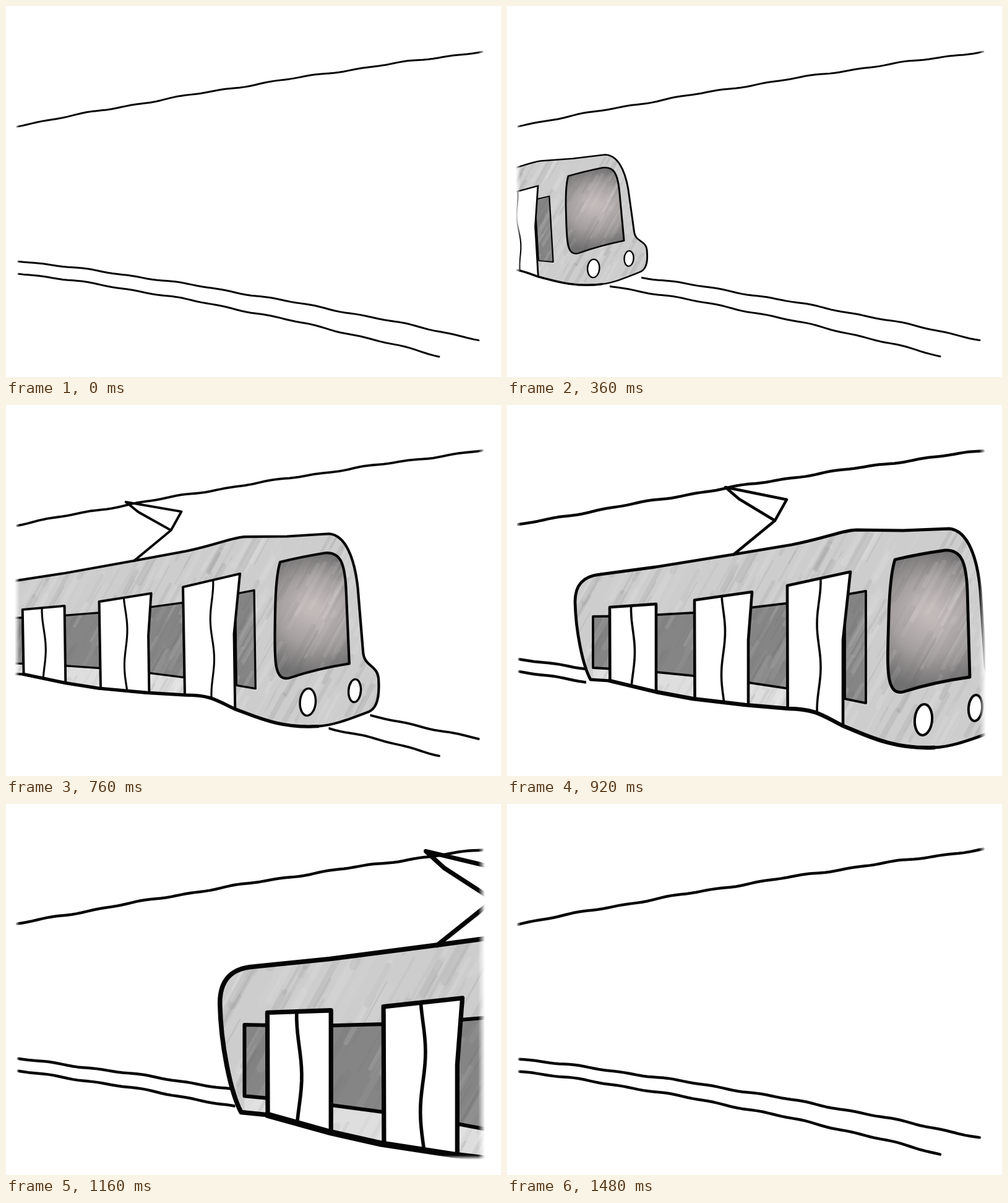
Write an HTML page with a canvas that moves like this. It is 800 by 600 pixels and loops after 1.68 s.

```html
<!DOCTYPE html>
<html lang="en">
<head>
<meta charset="utf-8">
<title>Passing tram</title>
<style>
  html, body { margin: 0; width: 100%; height: 100%; overflow: hidden; background: #fff; }
  canvas { display: block; }
</style>
</head>
<body>
<canvas id="stage" width="800" height="600"></canvas>
<script>
const ctx = document.getElementById("stage").getContext("2d");
const LOOP = 1680, HOLD = 200, STEP = 80, LAST = 17;

// The tram is drawn once around an anchor, then placed: drawing, x, y, x scale, y scale
const ANCHOR = { x: 627, y: 250 };
const POSES = [
  [0, -96, 285, .5, .45],
  [3, 99, 275, .69, .587],
  [6, 228, 266, .765, .709],
  [8, 443, 254, .905, .878],
  [10, 627, 250, 1, 1],
  [13, 1054, 252, 1.37, 1.39],
  [LAST, 1834, 265, 2, 1.95]
];

// Gently bent lines: height at the left end, slope, bend
const bent = (x0, y0, slope, bend) => x => y0 + slope * (x - x0) + bend * (x - x0) ** 2;
const wire = bent(18, 194, -.19, .00004);
const farRail = bent(20, 412, .12, .00007);
const nearRail = bent(20, 432, .13, .0001);
const doorTop = bent(166, 327, -.05, -.00025);
const windowTop = bent(139, 342, -.005, -.0002);
const windowBottom = bent(139, 425, .05, .00018);

let seed = 11;
const random = () => (seed = seed * 16807 % 2147483647) / 2147483647;

function line(...coords) {
  const path = new Path2D();
  for (let i = 0; i < coords.length; i += 2) path.lineTo(coords[i], coords[i + 1]);
  return path;
}

function shape(...coords) {
  const path = line(...coords);
  path.closePath();
  return path;
}

function lamp(x, y, rx, ry) {
  const path = new Path2D();
  path.ellipse(x, y, rx, ry, .08, 0, 7);
  return path;
}

const bottomEdge = "690 554 C 620 557 575 531 543 519 C 510 502 500 492 455 491 " +
  "L 385 485 L 300 475 L 241 464 L 166 446";
const underside = new Path2D("M " + bottomEdge);
const body = new Path2D(
  "M 135 444 C 122 420 111 365 110 318 C 110 292 122 277 150 274 L 240 262 L 370 241 " +
  "L 460 226 C 520 214 540 203 565 202 L 640 203 L 715 200 C 745 203 760 247 765 300 " +
  "L 773 420 C 775 448 801 442 800 475 C 801 505 795 525 780 530 C 740 545 715 553 " +
  bottomEdge + " Z");
const windshield = new Path2D(
  "M 627 250 Q 665 241 708 235 C 735 234 742 255 744 300 L 748 440 " +
  "Q 690 448 640 464 C 610 470 615 420 617 340 Q 619 275 627 250 Z");
const pantograph = line(366, 242, 433, 187, 452, 153, 353, 133, 375, 152, 433, 187);
const lamps = [lamp(673, 509, 14, 25), lamp(757, 490, 11, 21)];

// Doors run past the floor and are cut off by the body outline.
const doorSpans = [[166, 241], [303, 396], [453, 555]];
const doors = doorSpans.map(([l, r], i) =>
  shape(l, doorTop(l), r, doorTop(r), r - 6 * i, 380, r - 6 * i, 600, l + 1, 600));
const doorGaps = doorSpans.map(([l, r]) => {
  const x = (l + r) / 2, path = new Path2D();
  for (let y = doorTop(x); y < 560; y += 8) path.lineTo(x + 3 * Math.sin(y * .045 + x), y);
  return path;
});

const windowSpans = [[139, 166], [240, 303], [390, 453], [546, 580]];
const sideWindows = windowSpans.map(([l, r]) =>
  shape(l, windowTop(l), r, windowTop(r), r, windowBottom(r), l, windowBottom(l)));
const skirts = windowSpans.slice(0, 3).map(([l, r]) =>
  shape(l, windowBottom(l), r, windowBottom(r), r, 600, l, 600));

const brush = Array.from({ length: 420 }, () => {
  const x = 100 + random() * 740, y = 180 + random() * 370, length = 25 + random() * 70;
  const tone = random() < .55 ? 255 : 90;
  return {
    path: line(x, y, x - length * .55, y + length),
    color: `rgba(${tone},${tone},${tone},${.04 + random() * .08})`,
    width: 1.5 + random() * 9
  };
});

const glass = ctx.createRadialGradient(684, 335, 10, 684, 345, 115);
glass.addColorStop(0, "#c2bab9");
glass.addColorStop(.5, "#a59f9f");
glass.addColorStop(1, "#707070");

function ink(path, width) {
  ctx.strokeStyle = "#050505";
  ctx.lineWidth = width;
  ctx.stroke(path);
}

function fill(path, color) {
  ctx.fillStyle = color;
  ctx.fill(path);
}

function poseAt(drawing) {
  const next = Math.max(1, POSES.findIndex(p => p[0] >= drawing));
  const a = POSES[next - 1], b = POSES[next];
  const mix = (drawing - a[0]) / (b[0] - a[0]);
  const [, x, y, sx, sy] = a.map((v, i) => v + (b[i] - v) * mix);
  const ky = (x - ANCHOR.x) * .00011;
  return { x, y, sx, sy, ky, kx: Math.max(0, -.6 * ky) };
}

// Hand-drawn line whose tremble changes with every drawing
function cable(height, from, to, drawing) {
  const path = new Path2D();
  for (let x = from; x <= to; x += 8) {
    const tremble = Math.sin(x * .085 + drawing * 2.3) + Math.sin(x * .037 + drawing * 4.1);
    path.lineTo(x, height(x) + .7 * tremble);
  }
  ink(path, Math.min(4.5, Math.max(3, 3 + (drawing - 6) * .4)));
}

// The tram covers a rail from its rear end to the given point of its front.
function rail(height, end, front, pose, drawing) {
  const ground = x => pose.x + pose.sx * (x - ANCHOR.x) + pose.kx * 280;
  ctx.save();
  ctx.beginPath();
  ctx.rect(0, 0, Math.max(0, ground(128)), 600);
  ctx.rect(Math.max(0, ground(front)), 0, 1600, 600);
  ctx.clip();
  cable(height, 20, end, drawing);
  ctx.restore();
}

function drawTram({ x, y, sx, sy, kx, ky }) {
  const weight = .6 + .4 * sx;
  ctx.save();
  ctx.transform(sx, ky, kx, sy, x, y);
  ctx.translate(-ANCHOR.x, -ANCHOR.y);

  ctx.save();
  ctx.clip(body);
  fill(body, "#cdcdcd");
  skirts.forEach(p => fill(p, "#dedede"));
  sideWindows.forEach(p => fill(p, "#868585"));
  fill(windshield, glass);
  for (const b of brush) {
    ctx.strokeStyle = b.color;
    ctx.lineWidth = b.width;
    ctx.stroke(b.path);
  }
  sideWindows.forEach(p => ink(p, 3.8 * weight));
  doors.forEach(p => { fill(p, "#fff"); ink(p, 4.6 * weight); });
  doorGaps.forEach(p => ink(p, 3.6 * weight));
  ctx.restore();

  lamps.forEach(p => { fill(p, "#fff"); ink(p, 4 * weight); });
  ink(body, 4.8 * weight);
  ink(windshield, 4.8 * weight);
  ink(underside, 6.4 * weight);
  ink(pantograph, 4.6 * weight);
  ctx.restore();
}

function fadeEdge(x0, y0, x1, y1, rect) {
  const g = ctx.createLinearGradient(x0, y0, x1, y1);
  g.addColorStop(0, "#fff");
  g.addColorStop(1, "#fff0");
  ctx.fillStyle = g;
  ctx.fillRect(...rect);
}

function draw(time) {
  const drawing = time < HOLD ? 0 : Math.min(LAST, 1 + Math.floor((time - HOLD) / STEP));
  const pose = poseAt(drawing);
  ctx.fillStyle = "#fff";
  ctx.fillRect(0, 0, 800, 600);
  ctx.lineCap = ctx.lineJoin = "round";
  rail(farRail, 764, 784, pose, drawing);
  rail(nearRail, 705, 710, pose, drawing);
  if (drawing > 0 && drawing < LAST) drawTram(pose);
  cable(wire, 18, 772, drawing);
  fadeEdge(14, 0, 22, 0, [0, 0, 22, 600]);
  fadeEdge(774, 0, 763, 0, [763, 0, 37, 600]);
  fadeEdge(0, 575, 0, 568, [0, 568, 800, 32]);
}

const start = performance.now();
function tick() {
  draw((performance.now() - start) % LOOP);
  requestAnimationFrame(tick);
}
tick();
</script>
</body>
</html>
```
